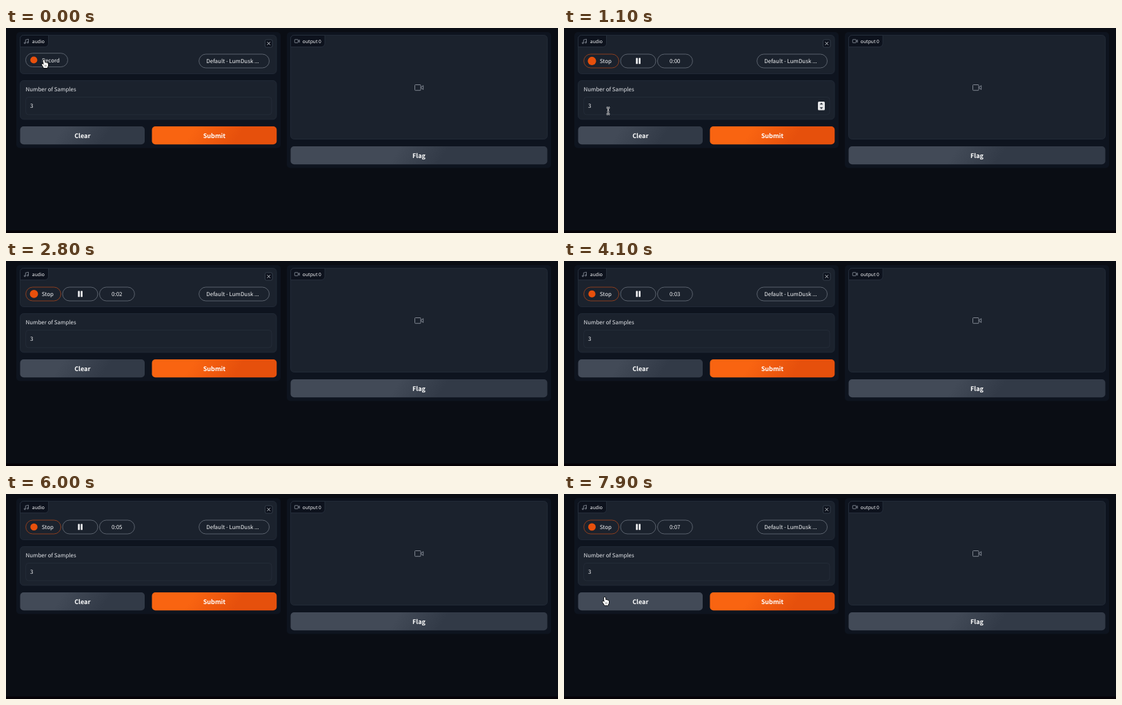
Write an HTML page with a canvas that moves like this. It is 800 by 298 pixels and loops after 8 s.

```html
<!DOCTYPE html>
<html lang="en">
<head>
<meta charset="utf-8">
<title>Audio recorder</title>
<style>
  html, body { margin: 0; width: 100%; height: 100%; overflow: hidden; background: #0a0d14; }
  canvas { display: block; width: 800px; height: 298px; }
</style>
</head>
<body>
<canvas id="stage"></canvas>
<script>
const canvas = document.getElementById('stage');
const ctx = canvas.getContext('2d');
const dpr = window.devicePixelRatio || 1;
canvas.width = 800 * dpr;
canvas.height = 298 * dpr;

const LOOP = 8000, STEP = 100, REC_START = 500, PULSE = 1800;
const FONT = '"Noto Sans CJK JP", "Noto Sans CJK SC", "Noto Sans CJK", "Open Sans", sans-serif';
const BLOCK = '#1b222d', EDGE = '#252e3a', TAB = '#0d121d', PILL = '#69707c', ORANGE = '#e8500c';

// Pointer path: time, x, y
const LEAVE = [[0, 55, 46.3], [100, 55, 46.8], [500, 55, 47], [900, 60, 82],
               [1100, 64, 120.5], [1300, 69, 205], [1500, 75, 304]];
const RETURN = [[7700, 57, 206], [7800, 58, 170], [7900, 59, 150]];

function pointerAt(t) {
  const path = t < 1500 ? LEAVE : t >= 7700 ? RETURN : null;
  if (!path) return null;
  for (let i = 1; i < path.length; i++) {
    const [t0, x0, y0] = path[i - 1], [t1, x1, y1] = path[i];
    if (t <= t1) {
      const k = (t - t0) / (t1 - t0);
      return { x: x0 + (x1 - x0) * k, y: y0 + (y1 - y0) * k };
    }
  }
  const [, x, y] = path[path.length - 1];
  return { x, y };
}

const inside = (p, x, y, r, b) => !!p && p.x >= x && p.x <= r && p.y >= y && p.y <= b;

// CSS "ease": cubic-bezier(.25, .1, .25, 1)
function ease(x) {
  const bez = (u, a, b) => 3 * u * (1 - u) ** 2 * a + 3 * u * u * (1 - u) * b + u ** 3;
  let lo = 0, hi = 1;
  for (let i = 0; i < 24; i++) {
    const mid = (lo + hi) / 2;
    if (bez(mid, .25, .25) < x) lo = mid; else hi = mid;
  }
  return bez(lo, .1, 1);
}

function box(x, y, r, b, radius, fill, stroke) {
  ctx.beginPath();
  ctx.roundRect(x, y, r - x, b - y, radius);
  if (fill) { ctx.fillStyle = fill; ctx.fill(); }
  if (stroke) { ctx.strokeStyle = stroke; ctx.lineWidth = .8; ctx.stroke(); }
}

function text(str, x, y, size, { weight = 400, align = 'left', color = '#f3f4f6' } = {}) {
  ctx.font = `${weight} ${size}px ${FONT}`;
  ctx.textAlign = align;
  ctx.fillStyle = color;
  ctx.fillText(str, x, y);
}

function line(points, color, width, closed) {
  ctx.beginPath();
  points.forEach(([x, y]) => ctx.lineTo(x, y));
  if (closed) ctx.closePath();
  ctx.strokeStyle = color;
  ctx.lineWidth = width;
  ctx.stroke();
}

function dot(x, y, r, color) {
  ctx.beginPath();
  ctx.arc(x, y, r, 0, Math.PI * 2);
  ctx.fillStyle = color;
  ctx.fill();
}

function button(label, x, y, r, b, from, to) {
  const g = ctx.createLinearGradient(x, y, x + 18, b + 4);
  const diag = ctx.createLinearGradient((x + r) / 2 - 25, y - 3, (x + r) / 2 + 25, b + 3);
  const fill = from === to ? g : diag;
  fill.addColorStop(0, from);
  fill.addColorStop(1, to);
  box(x, y, r, b, 5, fill);
  text(label, (x + r) / 2, y + 16.7, 9.05, { weight: 700, align: 'center', color: '#fff' });
}

function camera(x, y, s, color, width) {
  ctx.beginPath();
  ctx.roundRect(x, y, 8.6 * s, 8.2 * s, s);
  ctx.strokeStyle = color;
  ctx.lineWidth = width;
  ctx.stroke();
  line([[x + 8.6 * s, y + 4 * s], [x + 12.2 * s, y + 1.2 * s], [x + 12.2 * s, y + 7 * s]], color, width, true);
}

function notes(x, y) {
  const c = '#9aa1ac';
  line([[x + 2, y + 5.6], [x + 2, y + 1], [x + 6.2, y], [x + 6.2, y + 4.8]], c, .7);
  for (const [dx, dy] of [[1, 5.6], [5.2, 4.8]]) {
    ctx.beginPath();
    ctx.arc(x + dx, y + dy, 1, 0, Math.PI * 2);
    ctx.stroke();
  }
}

function tab(label, x, r) {
  box(x, 10.5, r, 27.5, [5, 0, 5, 0], TAB, '#2a3340');
  text(label, x + 17.3, 21.7, 6.82, { weight: 500 });
}

function controls(t) {
  if (t < REC_START) {
    box(28.5, 36.7, 89.5, 56.5, 10, null, PILL);
    dot(40.3, 46.5, 5.1, ORANGE);
    text('Record', 52, 49.5, 7.9, { weight: 500 });
    return;
  }
  const elapsed = t - REC_START;
  const phase = elapsed % PULSE / (PULSE / 2);
  const grow = phase < 1 ? ease(phase) : 1 - ease(phase - 1);
  box(28.7, 38, 79.5, 58, 10, null, '#a5441c');
  dot(40.5, 47.9, 5.1 * (1 + .2 * grow), ORANGE);
  text('Stop', 51.8, 51, 7.96, { weight: 500 });
  box(82, 38, 133, 58, 10, null, PILL);
  box(104.3, 43.6, 106.9, 52.3, .5, '#f3f4f6');
  box(108.3, 43.6, 110.9, 52.3, .5, '#f3f4f6');
  box(135.5, 38, 186.3, 58, 10, null, PILL);
  text('0:0' + Math.floor(elapsed / 1000), 160.8, 51, 7.96, { weight: 500, align: 'center' });
}

function spinner() {
  box(368, 107, 378, 119.5, 1.5, '#e6e7e9');
  ctx.fillStyle = '#333a44';
  for (const d of [-1, 1]) {
    const y = 113.2 + d * 2;
    ctx.beginPath();
    ctx.moveTo(370.6, y);
    ctx.lineTo(375.4, y);
    ctx.lineTo(373, y + d * 2.7);
    ctx.fill();
  }
}

function shape(path, x, y) {
  ctx.save();
  ctx.translate(x, y);
  ctx.lineJoin = 'round';
  ctx.strokeStyle = '#000';
  ctx.lineWidth = 1.4;
  ctx.stroke(path);
  ctx.fillStyle = '#fff';
  ctx.fill(path);
  ctx.restore();
}

const HAND = new Path2D('M-1.1 1Q-1 0 0 0Q.9 0 1 1L1.4 4Q2.3 3.3 3 4.3Q4 3.7 4.5 4.7Q5.8 4.4 6 5.6V8.2' +
  'Q5.9 9.6 5 10.6V11.8H-.4Q-.5 10.5-1.6 9.3L-3 7.2Q-3.4 6-2.3 6Q-1.4 6.1-.5 7.2Z');
const ARROW = new Path2D('M0 0V9.6L2.2 7.6L3.7 11L5.2 10.3L3.8 7H6.8Z');

function pointer(p) {
  const { x, y } = p;
  const overButton = inside(p, 20.5, 143, 201, 169.5) || inside(p, 28.5, 36.5, 89, 58);
  if (overButton) {
    shape(HAND, x, y);
    for (const dx of [1.6, 3.2]) line([[x + dx, y + 7.3], [x + dx, y + 10]], '#222', .5);
  } else if (inside(p, 28.5, 100.5, 385, 126)) {
    for (const [color, width] of [['#fff', 2.2], ['#15191f', .8]]) {
      line([[x - 2.2, y - 5.2], [x, y - 4.3], [x + 2.2, y - 5.2]], color, width);
      line([[x, y - 4.6], [x, y + 4.6]], color, width);
      line([[x - 2.2, y + 5.2], [x, y + 4.3], [x + 2.2, y + 5.2]], color, width);
      line([[x - 1.3, y + 1.5], [x + 1.3, y + 1.5]], color, width);
    }
  } else {
    ctx.save();
    ctx.translate(x, y);
    ctx.strokeStyle = '#fff';
    ctx.lineWidth = 1.6;
    ctx.stroke(ARROW);
    ctx.fillStyle = '#000';
    ctx.fill(ARROW);
    ctx.restore();
  }
}

function draw(t) {
  const p = pointerAt(t);
  ctx.setTransform(dpr, 0, 0, dpr, 0, 0);
  ctx.textRendering = 'geometricPrecision';
  ctx.fillStyle = '#0a0d14';
  ctx.fillRect(0, 0, 800, 298);
  ctx.fillStyle = '#050106';
  ctx.fillRect(0, 294.5, 800, 3.5);

  box(15, 6, 398, 174.5, 5, '#0e141f');
  box(407, 6, 790, 203.5, 5, '#0e141f');

  box(20.5, 10.5, 392, 66.5, 5, BLOCK, EDGE);
  tab('audio', 20.5, 61.5);
  notes(26.3, 16.2);
  box(375.5, 17, 386, 28, 2, TAB, '#3b4451');
  line([[378.5, 20.2], [383, 24.8]], '#dfe2e6', .8);
  line([[383, 20.2], [378.5, 24.8]], '#dfe2e6', .8);
  controls(t);
  box(279.7, 38, 381.5, 58, 10, null, PILL);
  text('Default - LumDusk ...', 290.3, 51, 7.96, { weight: 500 });

  box(20.5, 76.5, 392, 132.8, 5, BLOCK, EDGE);
  text('Number of Samples', 28.5, 92.1, 7.96, { color: '#e5e7eb' });
  box(28.7, 100.5, 385, 126, 4, null, '#262e3a');
  text('3', 35, 116.4, 7.96);
  if (inside(p, 28.5, 100.5, 385, 126)) spinner();

  const hover = inside(p, 20.5, 143, 201, 169.5);
  button('Clear', 20.5, 143, 201, 169.3, '#424a57', hover ? '#424a57' : '#323a47');
  button('Submit', 211.5, 143, 392.3, 169.3, '#f96411', '#e6500c');

  box(412.5, 10.5, 784.5, 161.5, 5, BLOCK, EDGE);
  tab('output 0', 412.5, 462);
  camera(418.3, 16.7, .58, '#9aa1ac', .7);
  camera(592.5, 82.5, 1, '#8b919b', .9);
  button('Flag', 412.5, 172, 784.5, 198.3, '#424a57', '#323a47');

  if (p) pointer(p);
}

function tick(now) {
  draw(Math.floor(now % LOOP / STEP) * STEP);
  requestAnimationFrame(tick);
}
requestAnimationFrame(tick);
</script>
</body>
</html>
```
